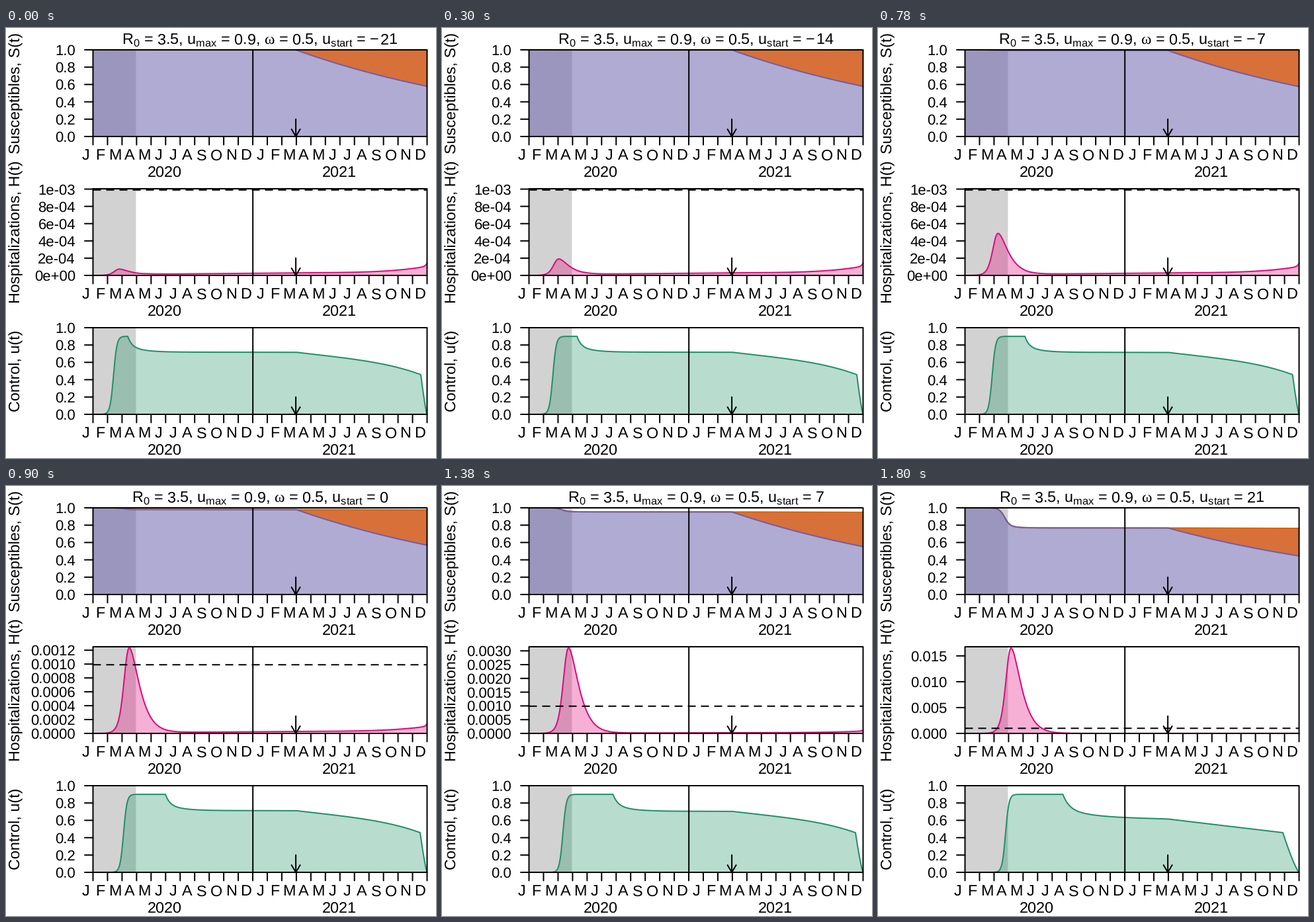
A matplotlib script for the animation above (2100 ms loop, 650 px wide and 650 px high).

```python
import numpy as np
import matplotlib.pyplot as plt
from matplotlib.animation import FuncAnimation
from matplotlib.patches import Rectangle

plt.rcParams.update({
    "path.snap": False,
    "text.hinting": "none",
    "font.family": "Liberation Sans",
    "mathtext.fontset": "custom",
    "mathtext.default": "rm",
    "mathtext.rm": "Liberation Sans",
    "mathtext.it": "Liberation Sans",
    "mathtext.cal": "Liberation Serif",
})

PX = 0.72                      # points per pixel at 100 dpi
LEFT, RIGHT = 131.5, 636.5
MONTH = (RIGHT - LEFT) / 23
HEIGHT = 131
BOTTOMS = (164, 374, 584)
DAY = (RIGHT - LEFT) / 700     # February 2020 to December 2021
GREY_END = LEFT + 90 * DAY
NEW_YEAR = LEFT + 335 * DAY
VACC = LEFT + 425 * DAY
CAPACITY = 0.00099

X = np.linspace(LEFT, RIGHT, 1011)

PURPLE, LILAC = "#6a5fb0", "#6f66ad"
ORANGE, RUST = "#d95f02", "#d8703a"
PINK, ROSE = "#df087e", "#e81d87"
GREEN, MINT = "#1f9068", "#349b73"

# One entry per start day: -21, -14, ... 21
IMMUNE = (0.001, 0.002, 0.007, 0.019, 0.047, 0.110, 0.232)
PEAK = (7.3e-5, 1.9e-4, 4.85e-4, 1.23e-3, 3.1e-3, 7.45e-3, 1.65e-2)
RESURGE = (1, 1, 0.98, 0.96, 0.82, 0.55, 0.2)
HOLD_END = (184, 204, 222, 241, 258.5, 271.5, 279.5)
RELAX = (1, 1, 1, 1.05, 1.15, 1.33, 1.5)
U_VACC = (0.717, 0.717, 0.715, 0.712, 0.704, 0.677, 0.615)
U_SLOPE = (0, 0, 0, 0, 0, 2e-5, 1.8e-4)
U_BEND = (0.64, 0.64, 0.64, 0.64, 0.65, 0.74, 1)
DROP_X = (627, 627, 626.7, 626, 625, 622.5, 612)
H_TICKS = (2e-4, 2e-4, 2e-4, 2e-4, 5e-4, 1e-3, 5e-3)
H_FORMAT = ("%.0e",) * 3 + ("%.4f",) * 2 + ("%.3f",) * 2


def logistic(z):
    return 1 / (1 + np.exp(-np.clip(z, -60, 60)))


def control_mid(k):
    return 162.5 + 5.05 * k


def susceptibles(k):
    """Share never infected, and the part of it not yet vaccinated."""
    d = X - control_mid(k) + 2
    drop = 0.85 * logistic(d / 4) + 0.15 * (1 - np.exp(-np.maximum(d, 0) / 14))
    after = np.maximum(X - VACC, 0)
    naive = 1 - IMMUNE[k] * drop - 0.005 * after / (RIGHT - VACC)
    return naive, naive * np.exp(-0.0598 * after / MONTH)


def hospitalizations(k):
    d = X - (171.5 + 4.95 * k)
    p, q, tau = 5, 16, 10.3
    before, after = np.minimum(d, 0), np.maximum(d, 0) / tau
    wave = (p + q) / (p * np.exp(-before / p) + q * np.exp(before / q))
    wave *= (1 + after) * np.exp(-after)
    s = np.maximum(X - VACC, 0) / (RIGHT - VACC)
    base = 1.8 + (X - 200) / 120 + 8.5 * s**4 + 5 * s**80
    base *= np.clip((X - 175) / 40, 0, 1) * 7.6e-6 * RESURGE[k]
    return PEAK[k] * wave + base


def control(k):
    rise = 0.9 * logistic((X - control_mid(k)) / 2.6)
    d = np.maximum(X - HOLD_END[k], 0) / RELAX[k]
    fade = 0.6 * np.exp(-d / 6) + 0.4 * np.exp(-d / 22)
    base = U_VACC[k] + U_SLOPE[k] * np.maximum(VACC - X, 0)
    s = np.clip((X - VACC) / (DROP_X[k] - VACC), 0, 1)
    bend = U_BEND[k] * s + (1 - U_BEND[k]) * s**4
    base = base - (U_VACC[k] - 0.458) * bend
    u = np.where(X < HOLD_END[k], rise, base + (0.9 - base) * fade)
    return u * np.clip((RIGHT - X) / (RIGHT - DROP_X[k]), 0, 1) ** 1.25


fig = plt.figure(figsize=(6.5, 6.5), dpi=100, facecolor="white")
ax = fig.add_axes([0, 0, 1, 1])


def line(x, y, color="black", width=2.0, **kw):
    ax.plot(x, y, color=color, lw=width * PX, solid_capstyle="round",
            solid_joinstyle="round", **kw)


def text(x, y, s, size=23.4, **kw):
    kw.setdefault("ha", "center")
    ax.text(x, y, s, fontsize=size * PX, va="baseline", **kw)


def area(y, floor, color, alpha=0.35):
    ax.fill_between(X, y, floor, color=color, alpha=alpha, lw=0)


def shade(bottom):
    ax.add_patch(Rectangle((LEFT, bottom - HEIGHT), GREY_END - LEFT, HEIGHT,
                           color="#d2d2d2", lw=0))


def frame(bottom, label, ticks):
    """Box, axes, year divider and vaccination arrow of one panel."""
    top = bottom - HEIGHT
    line([LEFT, RIGHT, RIGHT, LEFT, LEFT], [bottom, bottom, top, top, bottom])
    line([NEW_YEAR] * 2, [top, bottom])
    line([VACC] * 2, [bottom - 0.2 * HEIGHT, bottom])
    line([VACC - 6.5, VACC, VACC + 6.5], [bottom - 11, bottom, bottom - 11])

    for i, name in enumerate("JFMAMJJASOND" * 2):
        x = LEFT + i * MONTH
        line([x, x], [bottom, bottom + 12.5])
        text(x - MONTH / 2, bottom + 35.3, name)
    for i, year in enumerate(("2020", "2021")):
        text(LEFT + (5 + 12 * i) * MONTH - 1, bottom + 61, year)

    for y, s in ticks:
        line([LEFT - 12.5, LEFT], [y, y])
        text(105, y + 7.8, s, 22.2, ha="right")
    text(21, bottom - HEIGHT / 2, label, rotation=90, rotation_mode="anchor")


def unit_ticks(bottom):
    return [(bottom - HEIGHT * v, "%.1f" % v) for v in np.arange(6) / 5]


def title(day):
    gap = r"\hspace{0.13}"
    eq, sep = gap + "=" + gap, "," + gap
    sign = "{-}" + gap if day < 0 else ""
    parts = (r"R_0" + eq + "3.5", r"u_{max}" + eq + "0.9",
             r"\mathcal{\omega}" + eq + "0.5",
             r"u_{start}" + eq + sign + str(abs(day)))
    text(384, 24, "$" + sep.join(parts) + "$")


def draw(k):
    ax.clear()
    ax.set(xlim=(0, 650), ylim=(650, 0))
    ax.axis("off")
    title(7 * k - 21)
    for b in BOTTOMS:
        shade(b)

    b = BOTTOMS[0]
    naive, sus = (b - HEIGHT * v for v in susceptibles(k))
    area(sus, b, LILAC, 0.55)
    area(naive, sus, RUST, 1)
    line(X, naive, ORANGE)
    line(X, sus, PURPLE)
    frame(b, "Susceptibles, S(t)", unit_ticks(b))

    b = BOTTOMS[1]
    top = max(0.001004, 1.016 * PEAK[k])
    scale = HEIGHT / top
    hosp = b - scale * hospitalizations(k)
    area(hosp, b, ROSE)
    line(X, hosp, PINK)
    line([LEFT, RIGHT], [b - scale * CAPACITY] * 2, dashes=(6, 4),
         dash_capstyle="butt")
    values = np.arange(int(top / H_TICKS[k] + 1e-6) + 1) * H_TICKS[k]
    frame(b, "Hospitalizations, H(t)",
          [(b - scale * v, H_FORMAT[k] % v) for v in values])

    b = BOTTOMS[2]
    u = b - HEIGHT * control(k)
    area(u, b, MINT)
    line(X, u, GREEN)
    frame(b, "Control, u(t)", unit_ticks(b))


anim = FuncAnimation(fig, draw, frames=7, interval=300, repeat=True,
                     repeat_delay=0)
plt.show()
```
